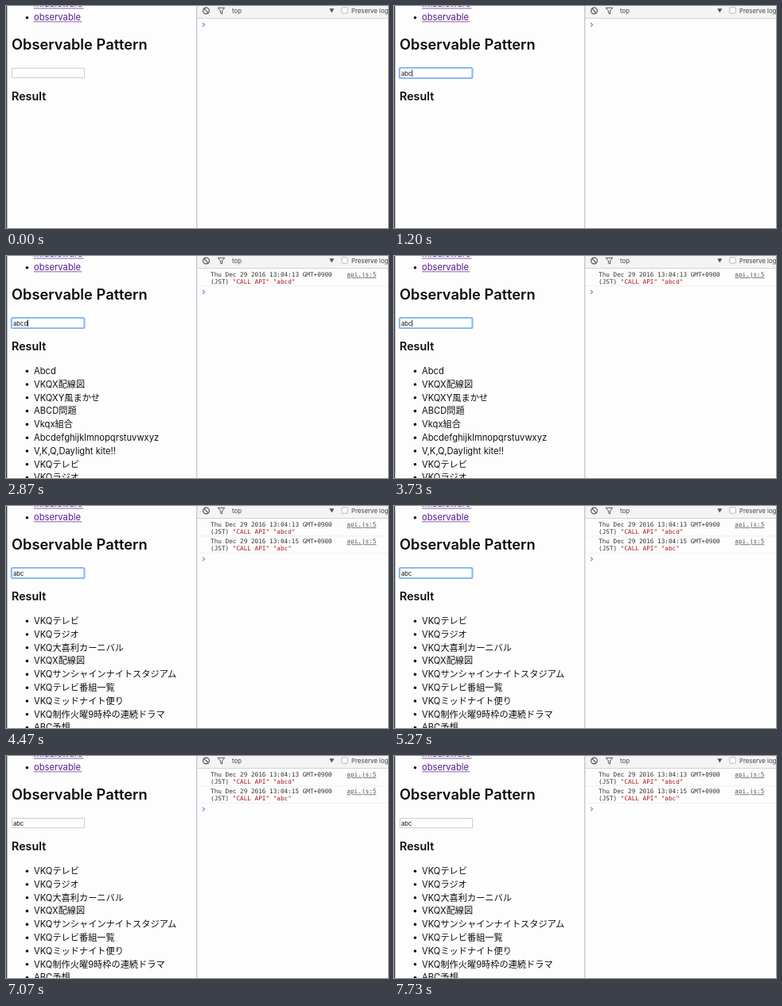
An HTML page for the animation above (7.79 s loop, 480 by 280 pixels).

```html
<!DOCTYPE html>
<html lang="ja">
<head>
<meta charset="utf-8">
<title>Observable Pattern</title>
<style>
  html, body { margin: 0; width: 100%; height: 100%; overflow: hidden; background: #fefdfe; }
  svg { display: block; width: 480px; height: 280px; }
  text { font-family: Inter, "Noto Sans CJK JP", "Noto Sans CJK", sans-serif; white-space: pre; }
  .page { font-size: 11.2px; fill: #111; }
  .link { fill: #551a8b; }
  .rule { stroke: #551a8b; stroke-width: .7; }
  .head { font-weight: 600; fill: #0c0c0c; }
  .typed { font-size: 7.7px; fill: #111; }
  .tool { font-size: 7.8px; fill: #444; }
  .log text { font: 7.7px "DejaVu Sans Mono", monospace; fill: #333; }
  .log .str { fill: #a81818; }
  .log .src { fill: #555; text-decoration: underline; }
  .icon { fill: none; stroke: #555; stroke-width: 1.2; }
</style>
</head>
<body>
<svg viewBox="0 0 480 280">
  <rect width="480" height="280" fill="#fefdfe"/>
  <rect width="1.4" height="280" fill="#3b3b44"/>

  <!-- page -->
  <g class="page">
    <text class="link" x="35" y="1.2">middleware</text>
    <path class="rule" d="M35 3H97.5M35 19.8H95.3"/>
    <circle cx="26.5" cy="14.8" r="1.8"/>
    <text class="link" x="35" y="18">observable</text>
    <text class="head" x="7" y="55" font-size="18.3">Observable Pattern</text>
    <text class="head" x="7" y="119.3" font-size="14.3">Result</text>
    <rect x="7.5" y="78.5" width="91" height="12" fill="#fff" stroke="#cdcdd8"/>
    <rect data-show="400-6600" x="6.9" y="78" width="91.6" height="13" rx="1.5" fill="#fff" stroke="#8dbaf3" stroke-width="2.2"/>
    <text class="typed" id="typed" x="9" y="87.7"></text>
    <rect id="caret" y="80.5" width=".9" height="8.5" fill="#111"/>
    <g id="first" data-show="2270-4330"></g>
    <g id="second" data-show="4330-7790"></g>
  </g>

  <!-- developer tools -->
  <rect x="240" width="240" height="15" fill="#f5f4f5"/>
  <path d="M240 15.5H480" stroke="#d4d4d4"/>
  <path d="M239.8 0V280" stroke="#b4b4b4"/>
  <g class="icon">
    <circle cx="251.5" cy="6" r="3.9"/>
    <path d="M248.8 3.2L254.2 8.8"/>
    <path d="M266.2 2.3H274.8L271.6 6V10L269.4 8.8V6Z" stroke-width="1"/>
  </g>
  <text class="tool" x="284" y="8.5">top</text>
  <path d="M406.3 3.2H412.3L409.3 8.4Z" fill="#555"/>
  <rect x="421.8" y="1.8" width="7.4" height="7.4" rx="1.3" fill="#fff" stroke="#b0b0b0" stroke-width=".9"/>
  <text class="tool" x="434" y="8.5">Preserve log</text>
  <g class="log" id="log"></g>
  <path id="prompt" d="M247 -2.4L249.6 0L247 2.4" fill="none" stroke="#6f93dd" stroke-width="1.2"/>
</svg>
<script>
const LOOP = 7790, BLUR = 6600;
const edits = [[0, ""], [400, ""], [750, "a"], [900, "ab"], [1050, "abc"], [1400, "abcd"], [3550, "abc"]];
const calls = [[2000, "13", "abcd"], [4130, "15", "abc"]];
const results = {
  first: ["Abcd", "VKQX配線図", "VKQXY風まかせ", "ABCD問題", "Vkqx組合",
    "Abcdefghijklmnopqrstuvwxyz", "V,K,Q,Daylight kite!!", "VKQテレビ", "VKQラジオ"],
  second: ["VKQテレビ", "VKQラジオ", "VKQ大喜利カーニバル", "VKQX配線図",
    "VKQサンシャインナイトスタジアム", "VKQテレビ番組一覧", "VKQミッドナイト便り",
    "VKQ制作火曜9時枠の連続ドラマ", "ABC予想"]
};
const $ = id => document.getElementById(id);

for (const [id, items] of Object.entries(results)) {
  $(id).innerHTML = items.map((item, i) => {
    const y = 149 + i * 16.8;
    return `<circle cx="26.5" cy="${y - 3.8}" r="1.8"/><text x="35" y="${y}">${item}</text>`;
  }).join("");
}

$("log").innerHTML = calls.map(([at, sec, query], i) => {
  const y = 26 + i * 21.4;
  return `<g data-show="${at}-${LOOP}">
    <text x="257" y="${y}">Thu Dec 29 2016 13:04:${sec} GMT+0900</text>
    <text x="257" y="${y + 8.8}">(JST) <tspan class="str">"CALL API"</tspan> <tspan class="str">"${query}"</tspan></text>
    <text class="src" x="428.3" y="${y}">api.js:5</text>
    <path d="M240 ${y + 11.9}H480" stroke="#f0f0f0"/></g>`;
}).join("");

const timed = [...document.querySelectorAll("[data-show]")].map(el => [el, ...el.dataset.show.split("-").map(Number)]);
const show = (el, on) => el.setAttribute("visibility", on ? "visible" : "hidden");

function draw() {
  const t = performance.now() % LOOP;
  for (const [el, from, to] of timed) show(el, t >= from && t < to);

  const [since, value] = edits.filter(([at]) => at <= t).pop();
  const typed = $("typed");
  if (typed.textContent !== value) typed.textContent = value;
  $("caret").setAttribute("x", 9 + (value ? typed.getComputedTextLength() : 0));
  show($("caret"), since > 0 && t < BLUR && (t - since) % 1000 < 500);

  const lines = calls.filter(([at]) => at <= t).length;
  $("prompt").setAttribute("transform", `translate(0 ${23.6 + lines * 21.7})`);
  requestAnimationFrame(draw);
}
draw();
</script>
</body>
</html>
```
